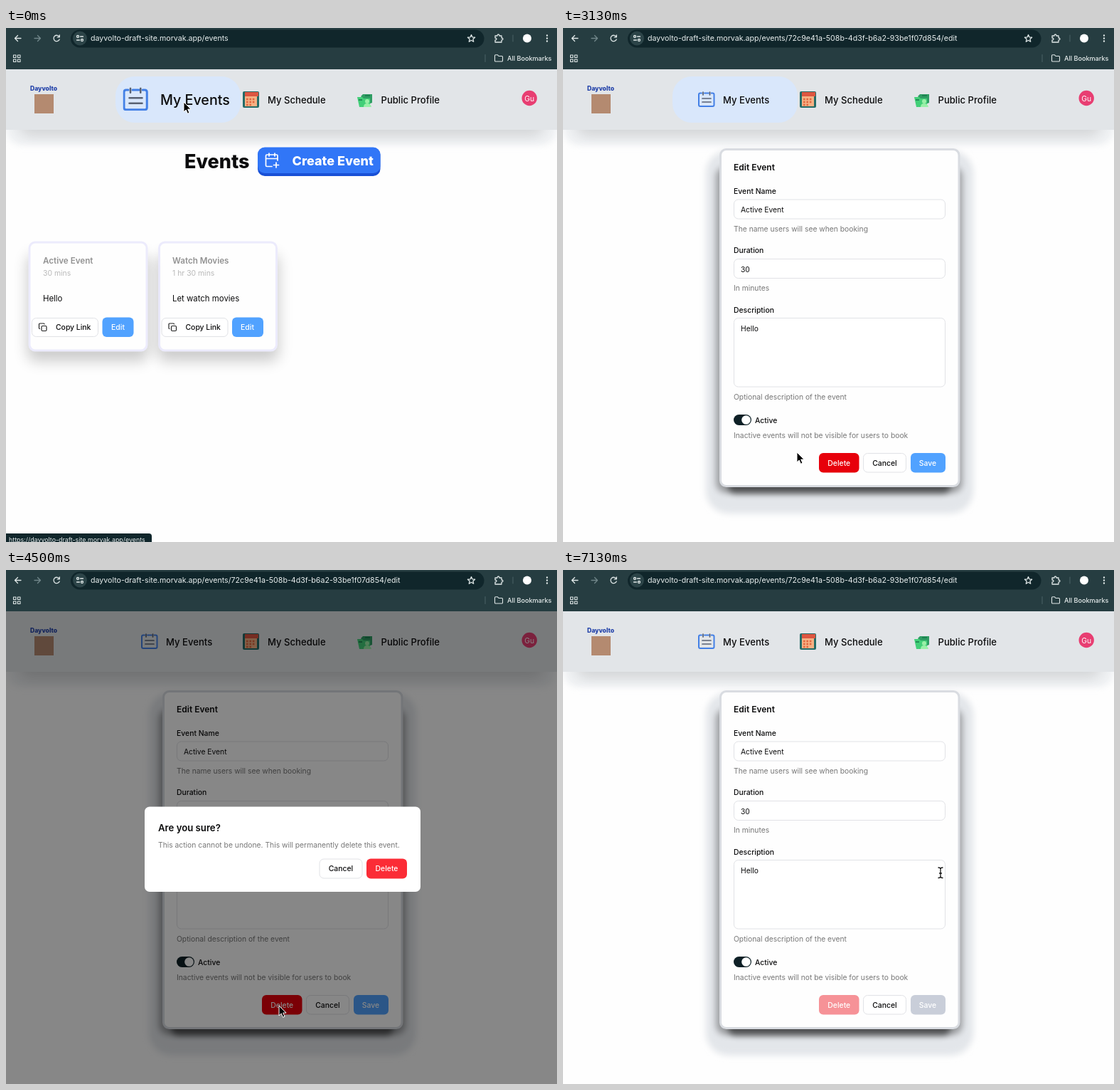
These frames come from a looping animation (775x722 px, 8 s). An HTML page:

```html
<!DOCTYPE html>
<html lang="en">
<head>
<meta charset="utf-8">
<title>Events</title>
<style>
  html, body { margin: 0; width: 100%; height: 100%; overflow: hidden; background: #fefefe; }
  svg { display: block; width: 775px; height: 722px; }
  text { font: 10.3px Inter, Roboto, sans-serif; fill: #0c0c0d; dominant-baseline: central; white-space: pre; }
  .med { font-weight: 500; font-size: 10.4px; }
  .semi { font-weight: 600; }
  .mid { text-anchor: middle; }
  .hint { fill: #777; }
  .white { fill: #fff; }
  .nav text { font-size: 13.1px; font-weight: 500; }
  .url text { font-size: 10.65px; fill: #e8eeee; }
  .status text { font-size: 8.9px; fill: #e6ecec; }
  .line { fill: none; stroke-linecap: round; stroke-linejoin: round; }
  .field { fill: #fff; stroke: #e1e2e6; }
  .name { font-size: 11.65px; font-weight: 600; fill: #929292; }
  .time { font-size: 10.4px; fill: #b9b9b9; }
  .about { font-size: 11.4px; }

  /* One loop is 64 ticks of 125 ms; one tick is 1.5625% */
  .a { animation: 8s infinite step-end; }
  .nav-item { transform-origin: 241px 100.5px; animation-name: nav; }
  .pill { animation-name: pill; }
  .pill-dim { animation-name: pillDim; }
  .link1 { animation-name: link1; }
  .link2 { animation-name: link2; }
  .list { animation-name: list; }
  .form { animation-name: form; }
  .card1 { transform-origin: 115.5px 377px; animation-name: card1; }
  .card2 { transform-origin: 298px 377px; animation-name: card2; }
  .edit { animation-name: edit; }
  .shade { animation-name: shade; }
  .dialog { transform-origin: 389px 392px; animation-name: dialog; }
  .confirm { animation-name: confirm; }
  .remove { animation-name: remove; }
  .save { animation-name: save; }
  .arrow { animation-name: arrow, arrowSeen; }
  .beam { animation-name: beam; }

  @keyframes nav {
    0% { transform: scale(1.5); }
    3.125% { transform: scale(1.3); }
    4.6875% { transform: scale(1.08); }
    6.25%, to { transform: none; }
  }
  @keyframes pill { 0% { opacity: 1; } 53.125%, to { opacity: 0; } }
  @keyframes pillDim { 0% { opacity: 0; } 64.0625% { opacity: .9; } 82.8125%, to { opacity: 0; } }
  @keyframes link1 { 0% { opacity: 1; } 4.6875%, to { opacity: 0; } }
  @keyframes link2 { 0% { opacity: 0; } 15.625% { opacity: 1; } 31.25%, to { opacity: 0; } }
  @keyframes list { 0% { opacity: 1; } 31.25%, to { opacity: 0; } }
  @keyframes form { 0% { opacity: 0; } 31.25%, to { opacity: 1; } }
  @keyframes card1 {
    0% { transform: none; }
    12.5% { transform: translateY(-1px) scale(1.04); }
    14.0625% { transform: translateY(-2px) scale(1.08); }
    15.625%, to { transform: translateY(-3px) scale(1.1); }
  }
  @keyframes card2 {
    0% { transform: none; }
    9.375% { transform: translateY(-1px) scale(1.03); }
    10.9375% { transform: translateY(-1px) scale(1.05); }
    12.5% { transform: scale(1.02); }
    14.0625%, to { transform: none; }
  }
  @keyframes edit { 0% { fill: #51a2ff; } 15.625%, to { fill: #155dfc; } }
  @keyframes shade {
    0% { opacity: 0; }
    53.125% { opacity: .12; }
    54.6875% { opacity: .38; }
    56.25% { opacity: .47; }
    82.8125% { opacity: .3; }
    84.375% { opacity: .1; }
    85.9375%, to { opacity: 0; }
  }
  @keyframes dialog {
    0% { opacity: 0; transform: scale(.95); }
    53.125% { opacity: .2; transform: scale(.96); }
    54.6875% { opacity: .76; transform: scale(.982); }
    56.25% { opacity: 1; transform: none; }
    82.8125% { opacity: .6; transform: scale(.98); }
    84.375% { opacity: .2; transform: scale(.96); }
    85.9375%, to { opacity: 0; transform: scale(.95); }
  }
  @keyframes confirm { 0% { fill: #fb2c36; } 78.125%, to { fill: #c10007; } }
  @keyframes remove { 0% { fill: #e7000b; } 82.8125%, to { fill: #f69297; } }
  @keyframes save { 0% { fill: #51a2ff; } 82.8125%, to { fill: #c9ced9; } }
  @keyframes arrow {
    0% { transform: translate(250px, 104px); animation-timing-function: steps(7); }
    10.9375% { transform: translate(290px, 350px); animation-timing-function: steps(4); }
    17.1875%, 29.6875% { transform: translate(161px, 422px); animation-timing-function: steps(6); }
    39.0625%, 40.625% { transform: translate(329px, 596px); animation-timing-function: steps(7); }
    51.5625%, 62.5% { transform: translate(384px, 612px); animation-timing-function: steps(7); }
    73.4375% { transform: translate(398px, 604px); animation-timing-function: steps(3); }
    78.125%, to { transform: translate(530px, 422px); }
  }
  @keyframes arrowSeen { 0% { opacity: 1; } 85.9375%, to { opacity: 0; } }
  @keyframes beam { 0% { opacity: 0; } 85.9375%, to { opacity: 1; } }
</style>
</head>
<body>
<svg viewBox="0 0 775 722">
  <defs>
    <filter id="blur" x="-30%" y="-60%" width="160%" height="240%"><feGaussianBlur stdDeviation="10"/></filter>
    <filter id="soft" x="-10%" y="-30%" width="120%" height="160%"><feGaussianBlur stdDeviation="4"/></filter>
    <clipPath id="page"><rect y="58" width="775" height="664"/></clipPath>
    <g id="card">
      <rect x="30" y="318" width="171" height="150" rx="12" opacity=".2" filter="url(#blur)"/>
      <rect x="33" y="301" width="165" height="152" rx="8" fill="#fefefe" stroke="#ecebfc" stroke-width="3"/>
      <rect class="field" x="36.5" y="407.5" width="93" height="26" rx="6"/>
      <g class="line" stroke="#222" stroke-width="1.2">
        <rect x="50" y="418.500" width="7" height="7" rx="1.5"/>
        <path d="M47.500 422.500q-1 0-1-1v-5.500q0-1 1-1h5.500q1 0 1 1"/>
      </g>
      <text class="med" x="70" y="420.500">Copy Link</text>
    </g>
  </defs>

  <g clip-path="url(#page)">
    <rect y="58" width="775" height="664" fill="#fefefe"/>

    <rect y="80" width="775" height="85" rx="22" fill="#e9ecef" opacity=".7" filter="url(#soft)"/>
    <rect x="20" y="80" width="735" height="70" rx="12" opacity=".13" filter="url(#blur)"/>
    <rect y="58" width="775" height="85" fill="#e2e5e8"/>
    <text class="mid" x="53" y="85" style="font-size:8.6px;font-weight:800;fill:#1f3fa8">Dayvolto</text>
    <rect x="40" y="93" width="27" height="27" fill="#b48a70"/>

    <rect class="a pill" x="154" y="68" width="176" height="65" rx="27" fill="#d9e7fb"/>
    <rect class="a pill-dim" x="178" y="77" width="126" height="47" rx="18" fill="#d9e7fb"/>
    <g class="nav">
      <g class="a nav-item">
        <g class="line" stroke-width="2">
          <path d="M195 91.500h-2q-2 0-2 2v14.500q0 2 2 2h17.500q2 0 2-2v-14.500q0-2-2-2h-2M199 91.500h6" stroke="#4380e6"/>
          <path d="M197 90v4M206.500 90v4M196 99h12M196 104h12" stroke="#596273" stroke-width="1.700"/>
        </g>
        <text x="225" y="100.500">My Events</text>
      </g>
      <rect x="333" y="89" width="23" height="23" rx="2" fill="#246c68"/>
      <rect x="336" y="90" width="19" height="6" fill="#dc5540"/>
      <rect x="336" y="96" width="17" height="14" fill="#f6b184"/>
      <path d="M338 100h13M338 104h13M338 108h8" stroke="#e2673f" stroke-width="2.400" stroke-dasharray="2.600 1.800"/>
      <text x="368" y="100.500">My Schedule</text>
      <path d="M499 96l3-3h13v12l-5 2z" fill="#2f9d63"/>
      <path d="M494 97h7l2 2h9v9l-2 3h-13z" fill="#42cf78"/>
      <circle cx="508" cy="103" r="3" fill="#9af0a8"/>
      <path d="M503 111q0-5 5-5t6 5z" fill="#9af0a8"/>
      <path d="M496 101h5M505 95h7" stroke="#197a4c" stroke-width="1.300"/>
      <text x="527.500" y="100.500">Public Profile</text>
    </g>
    <circle cx="736.200" cy="98.500" r="10.700" fill="#e83e72"/>
    <text class="mid white" x="736.200" y="98.500">Gu</text>

    <g class="a list">
      <text x="251" y="187" style="font-size:27px;font-weight:800">Events</text>
      <rect x="354" y="168" width="172.500" height="40" rx="10" fill="#1950d6"/>
      <rect x="354" y="167.500" width="172.500" height="36.500" rx="10" fill="#3176f7"/>
      <g class="line" stroke="#fff" stroke-width="1.700">
        <path d="M382 186v-6.500q0-1.500-1.500-1.500h-13.500q-1.500 0-1.500 1.500v13.500q0 1.500 1.500 1.500h7M370 176v4M378 176v4M365.500 183.500h16.500M380 189v7M376.500 192.500h7"/>
      </g>
      <text class="white" x="402.500" y="186.500" style="font-size:18px;font-weight:800">Create Event</text>

      <g class="a card2">
        <use href="#card" x="182.500"/>
        <text class="name" x="234" y="326.500">Watch Movies</text>
        <text class="time" x="234" y="344.500">1 hr 30 mins</text>
        <text class="about" x="234" y="379.500">Let watch movies</text>
        <rect x="318" y="406.500" width="44" height="27.500" rx="6" fill="#51a2ff"/>
        <text class="med mid white" x="339.500" y="420.500">Edit</text>
      </g>
      <g class="a card1">
        <use href="#card"/>
        <text class="name" x="52" y="326.500">Active Event</text>
        <text class="time" x="52" y="344.500">30 mins</text>
        <text class="about" x="52" y="379.500">Hello</text>
        <rect class="a edit" x="135.500" y="406.500" width="44" height="27.500" rx="6"/>
        <text class="med mid white" x="157.500" y="420.500">Edit</text>
      </g>
    </g>

    <g class="a form">
      <rect x="201" y="172" width="376" height="510" rx="32" fill="#e3e6ea" filter="url(#soft)"/>
      <rect x="215" y="195" width="347" height="458" rx="14" opacity=".3" filter="url(#soft)"/>
      <rect x="232" y="600" width="313" height="54" rx="10" opacity=".5" filter="url(#soft)"/>
      <rect x="221.500" y="170.500" width="335.500" height="473" rx="8" fill="#fefefe" stroke="#d9dce1" stroke-width="3"/>
      <text class="semi" x="240" y="195" style="font-size:12px">Edit Event</text>

      <text class="med" x="240" y="229">Event Name</text>
      <rect class="field" x="240.500" y="241" width="297" height="27" rx="6"/>
      <text x="250" y="255">Active Event</text>
      <text class="hint" x="240" y="281.500">The name users will see when booking</text>

      <text class="med" x="240" y="312.500">Duration</text>
      <rect class="field" x="240.500" y="324.500" width="297" height="27" rx="6"/>
      <text x="250" y="338.500">30</text>
      <text class="hint" x="240" y="365">In minutes</text>

      <text class="med" x="240" y="396">Description</text>
      <rect class="field" x="240.500" y="407.500" width="297" height="96.500" rx="6"/>
      <text x="250" y="422">Hello</text>
      <text class="hint" x="240" y="518">Optional description of the event</text>

      <rect x="240" y="543" width="25" height="15" rx="7.500" fill="#0e2026"/>
      <circle cx="257.500" cy="550.500" r="6.300" fill="#fff"/>
      <text class="med" x="270" y="551">Active</text>
      <text class="hint" x="240" y="571.500">Inactive events will not be visible for users to book</text>

      <rect class="a remove" x="360" y="597" width="56.500" height="27.500" rx="6"/>
      <text class="med mid white" x="388.300" y="611">Delete</text>
      <rect class="field" x="422.500" y="597.500" width="60" height="26.500" rx="6"/>
      <text class="med mid" x="452.500" y="611">Cancel</text>
      <rect class="a save" x="489" y="597" width="49" height="27.500" rx="6"/>
      <text class="med mid white" x="513" y="611">Save</text>
    </g>

    <rect class="a shade" y="58" width="775" height="664"/>

    <g class="a dialog">
      <rect x="195" y="332.500" width="388" height="119.500" rx="7" fill="#fff"/>
      <text class="semi" x="214" y="361.500" style="font-size:13.2px">Are you sure?</text>
      <text class="hint" x="214" y="386" style="font-size:10.3px">This action cannot be undone. This will permanently delete this event.</text>
      <rect class="field" x="441" y="406" width="60" height="27" rx="6"/>
      <text class="med mid" x="471" y="419.500">Cancel</text>
      <rect class="a confirm" x="507" y="405.500" width="57" height="28" rx="6"/>
      <text class="med mid white" x="535.500" y="419.500">Delete</text>
    </g>
  </g>

  <rect width="775" height="58" fill="#263d41"/>
  <rect x="91" y="2.500" width="581.500" height="25" rx="12.500" fill="#10262b"/>
  <circle cx="104" cy="14.500" r="10" fill="#2c4448"/>
  <g class="line" stroke="#dfe7e7" stroke-width="1.300">
    <path d="M21 14.500h-8.500M16.500 10.500l-4 4 4 4"/>
    <path d="M40 14.500h8.500M44.500 10.500l4 4-4 4" stroke="#71868a"/>
    <path d="M75 12.500a4.200 4.200 0 1 0 .2 3.500M75.300 9.800v3h-3"/>
    <path d="M104.500 12h4M99.500 17h4"/>
    <circle cx="101" cy="12" r="1.500"/>
    <circle cx="107" cy="17" r="1.500"/>
    <path d="M654.500 9.500l1.500 3.400 3.600.3-2.700 2.400.8 3.600-3.200-1.900-3.200 1.900.8-3.600-2.700-2.400 3.600-.3z"/>
    <path d="M688 11h3q0-2 1.500-2t1.500 2h3v3q2 0 2 1.500t-2 1.500v3h-9v-3q2 0 2-1.500t-2-1.500z"/>
    <path d="M713 10v9M674 37.500v10" stroke="#4b6266" stroke-width="1"/>
    <path d="M687.500 39v7q0 1 1 1h9q1 0 1-1v-5.500q0-1-1-1h-4.500l-1.500-1.700h-3q-1 0-1 1.200z" stroke-width="1.100"/>
    <path d="M10.500 38h3.500v3.500h-3.500zM16.500 38h3.500v3.500h-3.500zM10.500 44h3.500v3.500h-3.500zM16.500 44h3.500v3.500h-3.500z" stroke-width="1.100"/>
  </g>
  <circle cx="733" cy="14.500" r="6" fill="#fff"/>
  <path d="M761 10.500v.01M761 14.500v.01M761 18.500v.01" class="line" stroke="#dfe7e7" stroke-width="2.400"/>
  <g class="url">
    <text class="a list" x="119" y="14.500">dayvolto-draft-site.morvak.app/events</text>
    <text class="a form" x="119" y="14.500">dayvolto-draft-site.morvak.app/events/72c9e41a-508b-4d3f-b6a2-93be1f07d854/edit</text>
    <text x="705" y="42.500" style="font-size:9.1px;font-weight:500">All Bookmarks</text>
  </g>

  <g class="status">
    <g class="a link1">
      <path d="M0 710h201q4 0 4 4v8h-205z" fill="#10262b"/>
      <text x="4" y="718">https://dayvolto-draft-site.morvak.app/events</text>
    </g>
    <g class="a link2">
      <path d="M0 710h254q4 0 4 4v8h-258z" fill="#10262b"/>
      <text x="4" y="718">dayvolto-draft-site.morvak.app/events/.../edit</text>
    </g>
  </g>

  <path class="a arrow" d="M0 0v14l3.200-3 2.300 5.300 2.500-1.100-2.300-5.100h4.400z" fill="#000" stroke="#fff" stroke-width="1"/>
  <path class="a beam line" d="M528 418q3 0 3 2v10.500q0 2-3 2M534 418q-3 0-3 2M531 430.500q0 2 3 2M529.500 426h3" stroke="#111" stroke-width="1.300"/>
</svg>
</body>
</html>
```
